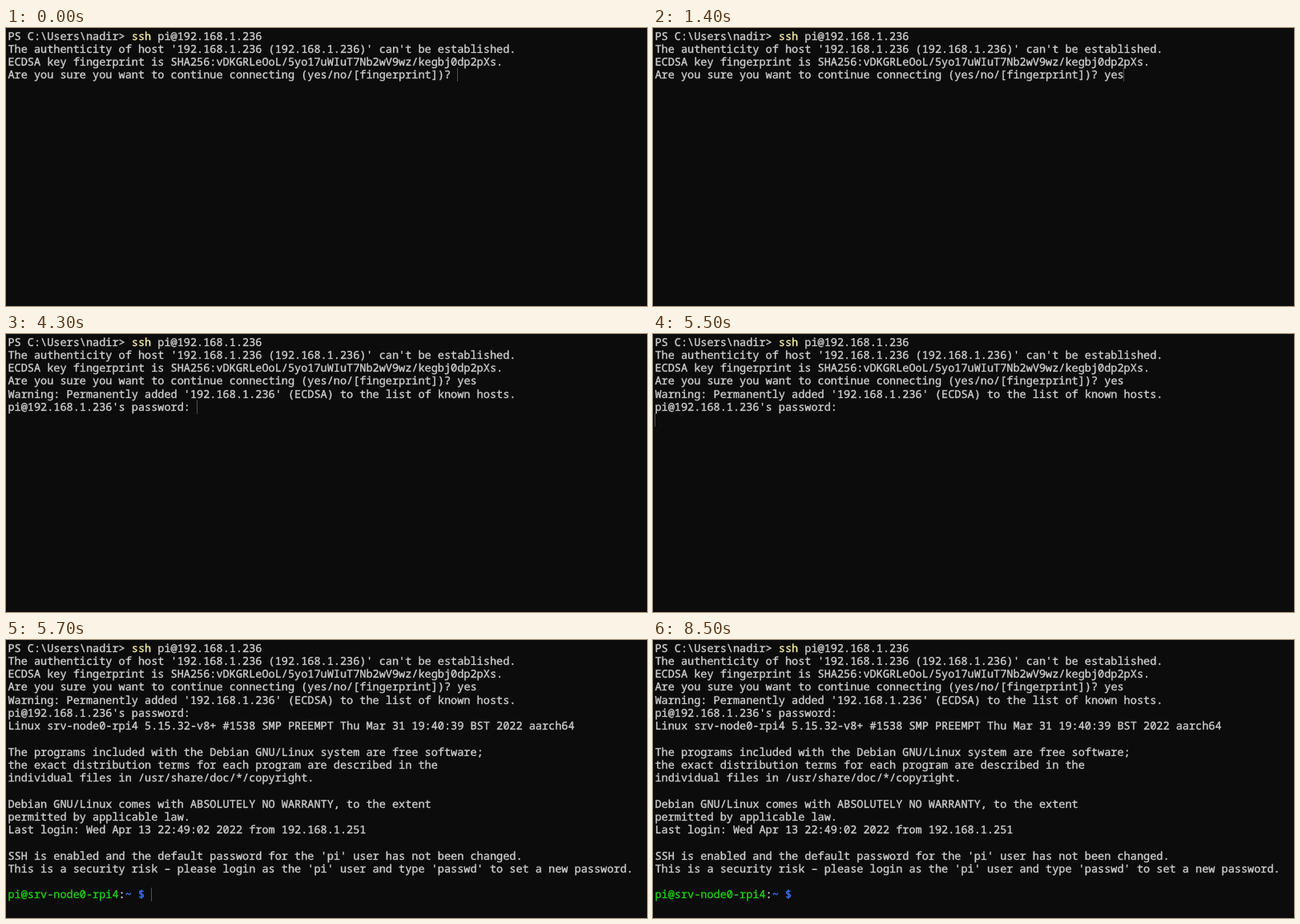
Animation of 800x348 px, one loop 8.6 s. Source, as an HTML page:

```html
<!DOCTYPE html>
<html lang="en">
<head>
<meta charset="utf-8">
<title>SSH login</title>
<style>
  html, body { margin: 0; width: 100%; height: 100%; overflow: hidden; background: #0c0c0c; }
  svg { display: block; width: 800px; height: 348px; }
  text {
    font: 13.55px "Noto Sans Mono", "DejaVu Sans Mono", monospace;
    font-variant-ligatures: none;
    text-rendering: geometricPrecision;
    white-space: pre;
    stroke-width: 0.35px;
  }
  text, tspan { fill: var(--ink); stroke: var(--ink); }
  text { --ink: #d0d0d0; }
  .cmd { --ink: #f9f1a5; }
  .host { --ink: #1ed014; }
  .path { --ink: #3b78ff; }
</style>
</head>
<body>
<svg viewBox="0 0 800 348"></svg>
<script>
const LOOP = 8600;
const LEFT = 2.4, TOP = 1.75, COL = 8.13, ROW = 16.25, BASE = 12.9;
const svg = document.querySelector('svg');

// Output blocks: time of appearance, first row, lines (a line may be [text, class] spans)
const blocks = [
  [0, 0, [
    [['PS C:\\Users\\nadir> '], ['ssh', 'cmd'], [' pi@192.168.1.236']],
    "The authenticity of host '192.168.1.236 (192.168.1.236)' can't be established.",
    'ECDSA key fingerprint is SHA256:vDKGRLeOoL/5yo17uWIuT7Nb2wV9wz/kegbj0dp2pXs.',
    'Are you sure you want to continue connecting (yes/no/[fingerprint])? '
  ]],
  [1800, 4, [
    "Warning: Permanently added '192.168.1.236' (ECDSA) to the list of known hosts.",
    "pi@192.168.1.236's password: "
  ]],
  [5600, 6, [
    'Linux srv-node0-rpi4 5.15.32-v8+ #1538 SMP PREEMPT Thu Mar 31 19:40:39 BST 2022 aarch64',
    '',
    'The programs included with the Debian GNU/Linux system are free software;',
    'the exact distribution terms for each program are described in the',
    'individual files in /usr/share/doc/*/copyright.',
    '',
    'Debian GNU/Linux comes with ABSOLUTELY NO WARRANTY, to the extent',
    'permitted by applicable law.',
    'Last login: Wed Apr 13 22:49:02 2022 from 192.168.1.251'
  ]],
  [5700, 16, [
    "SSH is enabled and the default password for the 'pi' user has not been changed.",
    "This is a security risk – please login as the 'pi' user and type 'passwd' to set a new password.",
    '',
    [['pi@srv-node0-rpi4', 'host'], [':'], ['~ $', 'path']]
  ]]
];

// Typed answer: time, text so far
const typed = [[0, ''], [800, 'y'], [1200, 'ye'], [1400, 'yes']];

// Cursor: time, column, row; no column means hidden
const cursorSteps = [
  [0, 69, 3], [500], [700, 69, 3], [800, 70, 3], [1200, 71, 3], [1400, 72, 3],
  [1800, 29, 5], [2600], [2900, 29, 5],
  [5500, 0, 6], [5600, 0, 15],
  [5700, 22, 19], [6300], [6800, 22, 19], [7400], [7900, 22, 19], [8400]
];

function add(parent, tag, attrs = {}) {
  const el = document.createElementNS('http://www.w3.org/2000/svg', tag);
  for (const key in attrs) el.setAttribute(key, attrs[key]);
  return parent.appendChild(el);
}

function addLine(parent, row, col, line) {
  const text = add(parent, 'text', { x: LEFT + col * COL, y: TOP + row * ROW + BASE });
  const spans = typeof line === 'string' ? [[line]] : line;
  for (const [str, cls = ''] of spans) add(text, 'tspan', { class: cls }).textContent = str;
  return text;
}

const groups = blocks.map(([time, first, lines]) => {
  const el = add(svg, 'g');
  lines.forEach((line, i) => { if (line) addLine(el, first + i, 0, line); });
  return { time, el };
});
const answer = addLine(svg, 3, 69, '');
const cursor = add(svg, 'rect', { width: 1, height: 17, fill: '#505050' });

const stepAt = (steps, t) => steps.findLast(step => step[0] <= t);
const show = (el, on) => { el.style.visibility = on ? 'visible' : 'hidden'; };

function draw(t) {
  for (const { time, el } of groups) show(el, t >= time);
  answer.textContent = stepAt(typed, t)[1];
  const [, col, row] = stepAt(cursorSteps, t);
  show(cursor, col !== undefined);
  if (col !== undefined) {
    cursor.setAttribute('x', Math.floor(LEFT + col * COL));
    cursor.setAttribute('y', Math.floor(TOP + row * ROW));
  }
}

const start = performance.now();
function tick() {
  draw((performance.now() - start) % LOOP);
  requestAnimationFrame(tick);
}
tick();
</script>
</body>
</html>
```
